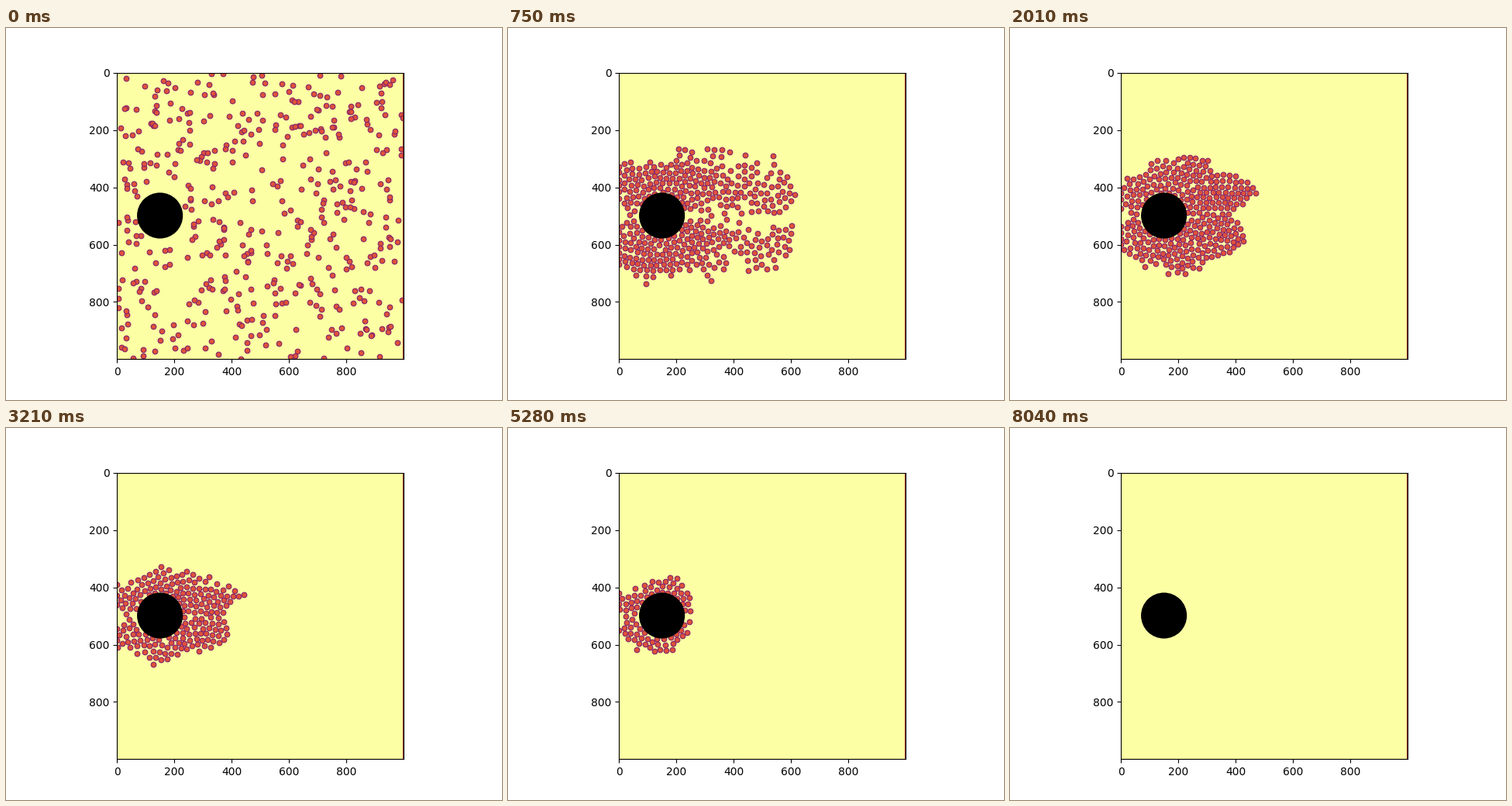
Write a matplotlib script that moves like this. It is 640 px wide and 480 px high and loops after 8.07 s.

```python
import matplotlib.pyplot as plt
import numpy as np
from matplotlib.animation import FuncAnimation
from matplotlib.patches import Circle

FRAMES, INTERVAL = 269, 30
SIZE = 1000
EXIT = 500j                    # positions are complex: x + y*1j
PILLAR, PILLAR_R = 150 + 500j, 80
BODY = 20                      # closest distance between two people

# Strides in eight directions, in four lengths
AROUND = np.array([complex(x, y) for x in (-1, 0, 1) for y in (-1, 0, 1) if x or y])
MOVES = np.outer((16, 8, 4, 2), AROUND).ravel()

# How many people are still inside, over the frames
CROWD_T = (0, 25, 67, 107, 176, 232, 266)
CROWD_N = (460, 390, 295, 195, 82, 33, 0)

EXIT_GAP = abs(EXIT - PILLAR)
EXIT_TANGENT = np.sqrt(EXIT_GAP**2 - PILLAR_R**2)
EXIT_ANGLE = np.arccos(PILLAR_R / EXIT_GAP)


def path_length(p):
    """Shortest way to the exit, bending around the pillar if it is in the way."""
    q = PILLAR - p
    d = np.maximum(np.abs(q), PILLAR_R)
    arc = np.abs(np.angle(q)) - EXIT_ANGLE - np.arccos(PILLAR_R / d)
    bent = EXIT_TANGENT + np.sqrt(d**2 - PILLAR_R**2) + PILLAR_R * arc
    return np.where(arc > 0, bent, np.abs(p - EXIT))


def start_crowd(rng):
    crowd = []
    while len(crowd) < CROWD_N[0]:
        p = complex(*rng.uniform(0, SIZE, 2))
        if abs(p - PILLAR) >= PILLAR_R:
            crowd.append(p)
    return np.array(crowd)


def advance(crowd):
    """Each person, nearest first, takes the free stride that shortens the way most."""
    left = path_length(crowd)
    for i in np.argsort(left):
        p = crowd[i]
        dist = np.abs(crowd - p)
        close = (dist > 0) & (dist < 44)
        room = min(BODY, dist[close].min(initial=99)) - 1e-6
        spots = p + MOVES
        np.maximum(spots.real, 0, out=spots.real)
        gaps = np.abs(spots[:, None] - crowd[close]).min(axis=1, initial=99)
        spots = spots[(gaps >= room) & (np.abs(spots - PILLAR) >= PILLAR_R)]
        if spots.size:
            ways = path_length(spots)
            best = ways.argmin()
            if ways[best] < left[i] - 0.1:
                crowd[i] = spots[best]


def leave(crowd, frame):
    excess = len(crowd) - round(np.interp(frame, CROWD_T, CROWD_N))
    if excess <= 0:
        return crowd
    crowd = crowd[np.argsort(np.abs(crowd - EXIT))]
    reach = min(40 + 2 * excess, 70)
    gone = min(excess, int((np.abs(crowd - EXIT) < reach).sum()))
    return crowd[gone:]


def simulate():
    crowd = start_crowd(np.random.default_rng(7))
    history = [crowd.copy()]
    for frame in range(1, FRAMES - 1):
        advance(crowd)
        crowd = leave(crowd, frame)
        history.append(crowd.copy())
    history.append(crowd[:0])
    return [np.column_stack((c.real, c.imag)) for c in history]


history = simulate()
inferno = plt.get_cmap("inferno")

fig, ax = plt.subplots(figsize=(6.4, 4.8), dpi=100)
ax.set_facecolor(inferno(1.0))
ax.set_aspect("equal")
ax.set_xlim(-0.5, SIZE - 0.5)
ax.set_ylim(SIZE - 0.5, -0.5)
ax.set_xticks(range(0, SIZE, 200))
ax.set_yticks(range(0, SIZE, 200))

# Dark walls on the right and bottom sides
wall = SIZE - 2
ax.plot([0, wall, wall], [wall, wall, 0], color="#a01c1c", lw=0.8, zorder=2)

dots = ax.scatter(*history[0].T, s=23, lw=0.8, zorder=1,
                  facecolor=[inferno(0.6)], edgecolor=[inferno(0.36)])
ax.add_patch(Circle((149.5, 498.5), PILLAR_R, facecolor="black", lw=0, zorder=1.5))


def draw(frame):
    dots.set_offsets(history[frame])
    return (dots,)


anim = FuncAnimation(fig, draw, frames=FRAMES, interval=INTERVAL,
                     repeat=True, repeat_delay=0)
plt.show()
```
